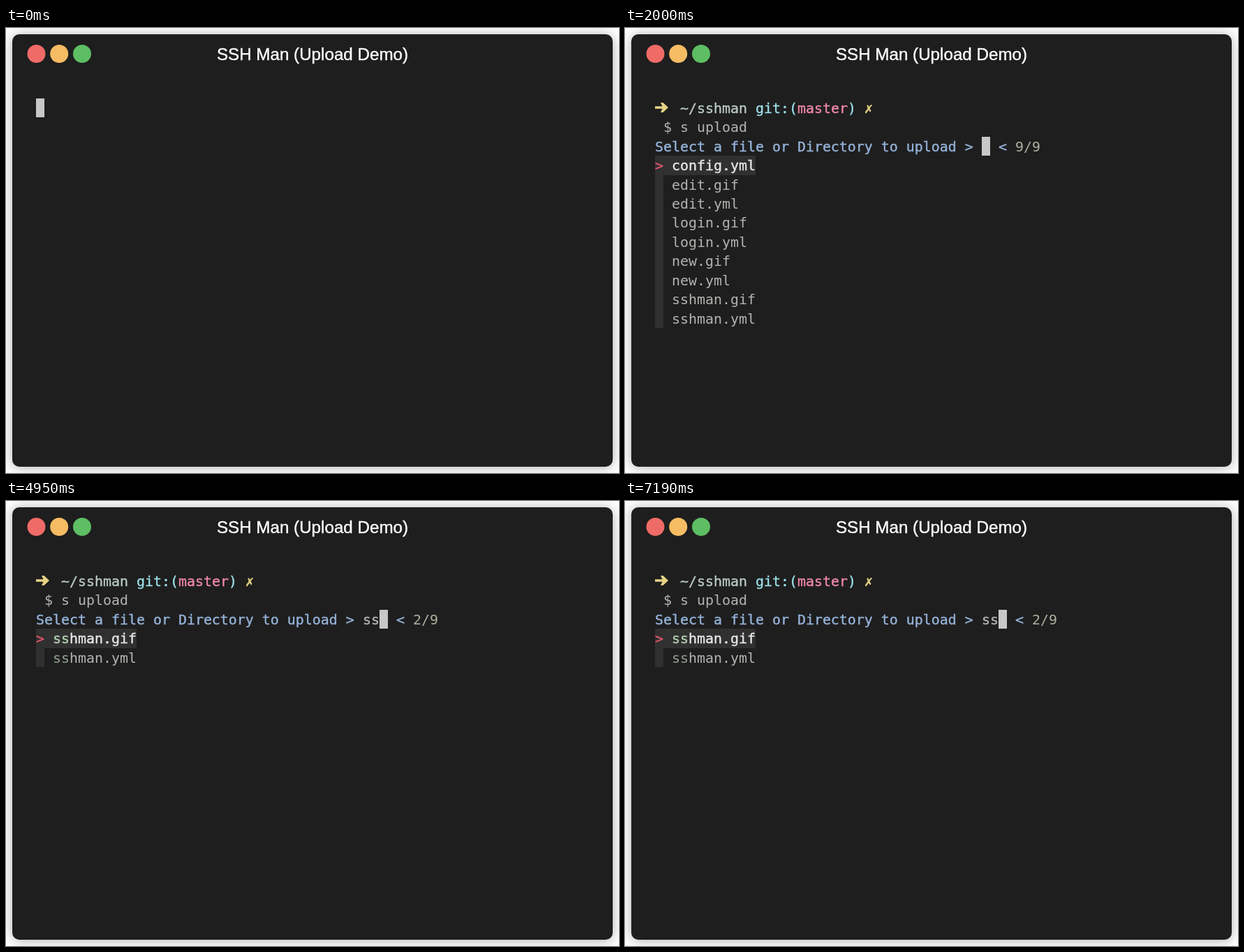
An HTML page that plays this animation: 878x638 px, repeating every 8000 ms.

```html
<!DOCTYPE html>
<html lang="en">
<head>
<meta charset="utf-8">
<title>SSH Man (Upload Demo)</title>
<style>
  html, body { margin: 0; width: 100%; height: 100%; overflow: hidden; background: #fff; }
  .window {
    position: absolute; left: 9px; top: 9px; width: 860px; height: 620px;
    border-radius: 10px; background: #1e1e1e; box-shadow: 0 1px 18px rgba(0, 0, 0, .32);
  }
  svg { position: absolute; left: 0; top: 0; }
  text { white-space: pre; }
  .title { font: 24.2px "Liberation Sans", Arial, sans-serif; fill: #fff; stroke: #fff; stroke-width: .4px; }
  #screen { font: 19.93px "DejaVu Sans Mono", monospace; font-variant-ligatures: none; }
  .strong { stroke: currentColor; stroke-width: .4px; }
</style>
</head>
<body>
<div class="window"></div>
<svg width="878" height="638" viewBox="0 0 878 638">
  <circle cx="43.5" cy="37" r="13" fill="#ef6b67"/>
  <circle cx="76.2" cy="37" r="13" fill="#f6bc63"/>
  <circle cx="109" cy="37" r="13" fill="#5dbe63"/>
  <text class="title" x="439" y="46" text-anchor="middle">SSH Man (Upload Demo)</text>
  <g id="screen"></g>
</svg>
<script>
const LOOP = 8000, LEFT = 43, TOP = 101, CELL_W = 12, CELL_H = 27.43;
const screen = document.getElementById('screen');
const files = ['config.yml', 'edit.gif', 'edit.yml', 'login.gif', 'login.yml',
               'new.gif', 'new.yml', 'sshman.gif', 'sshman.yml'];
const color = {
  arrow: '#e6d284', path: '#b9cac6', git: '#9ce0e8', branch: '#ef88a8', text: '#b3b3b0',
  prompt: '#95b3d9', count: '#afaf9f', pointer: '#e0566a', bar: '#303030',
  current: '#e8e8e6', currentMatch: '#b3d2b3', match: '#92a58f', cursor: '#c7c7c7'
};

// Each step: start time, typed command, then the picker query once it is open.
const steps = [
  [0, null], [30, ''], [580, 's'], [750, 's '], [960, 's u'], [1070, 's up'],
  [1340, 's upl'], [1530, 's uplo'], [1660, 's uploa'], [1720, 's upload'],
  [1870, 's upload', null], [2000, 's upload', ''],
  [3640, 's upload', 's'], [3840, 's upload', 'ss'], [3970, 's upload', 'ssh'],
  [4950, 's upload', 'ss'], [5050, 's upload', ''],
  [6950, 's upload', 's'], [7190, 's upload', 'ss']
];

const colX = col => LEFT + col * CELL_W;
const rowY = row => TOP + row * CELL_H;

function write(row, col, str, fill, strong) {
  const safe = str.replace(/&/g, '&amp;').replace(/</g, '&lt;');
  return `<text x="${colX(col)}" y="${rowY(row) + 20.8}" fill="${fill}"` +
    (strong ? ` class="strong" color="${fill}"` : '') + `>${safe}</text>`;
}

function block(row, col, cols, rows, fill) {
  const y = Math.round(rowY(row));
  return `<rect x="${colX(col)}" y="${y}" width="${cols * CELL_W}" ` +
    `height="${Math.round(rowY(row + rows)) - y}" fill="${fill}"/>`;
}

const cursor = (row, col) => block(row, col, 1, 1, color.cursor);

function shellPrompt(command) {
  return `<path d="M43 112.3H53.5L51 107H54.5L62 114L54.5 121H51L53.5 115.7H43Z" fill="${color.arrow}"/>` +
    write(0, 3, '~/sshman', color.path, true) +
    write(0, 12, 'git:(', color.git, true) +
    write(0, 17, 'master', color.branch, true) +
    write(0, 23, ')', color.git, true) +
    write(0, 25, '✗', color.arrow, true) +
    write(1, 1, '$ ' + command, color.text);
}

function picker(query) {
  const hits = files.filter(name => name.startsWith(query));
  const end = 39 + query.length;
  let out = write(2, 0, 'Select a file or Directory to upload >', color.prompt, true) +
    write(2, 39, query, color.text, true) + cursor(2, end) +
    write(2, end + 2, '<', color.prompt, true) +
    write(2, end + 4, `${hits.length}/${files.length}`, color.count) +
    block(3, 0, 1, hits.length, color.bar) +
    block(3, 0, hits[0].length + 2, 1, color.bar) +
    write(3, 0, '>', color.pointer, true);
  hits.forEach((name, i) => {
    const first = i === 0;
    out += write(3 + i, 2, query, first ? color.currentMatch : color.match, first) +
      write(3 + i, 2 + query.length, name.slice(query.length), first ? color.current : color.text, first);
  });
  return out;
}

function render([, command, query]) {
  if (command === null) return cursor(0, 0);
  const shell = shellPrompt(command);
  if (query === undefined) return shell + cursor(1, 3 + command.length);
  return shell + (query === null ? cursor(2, 0) : picker(query));
}

let shown;
function tick() {
  const time = performance.now() % LOOP;
  const step = steps.findLast(([start]) => start <= time);
  if (step !== shown) screen.innerHTML = render(shown = step);
  requestAnimationFrame(tick);
}
tick();
</script>
</body>
</html>
```
